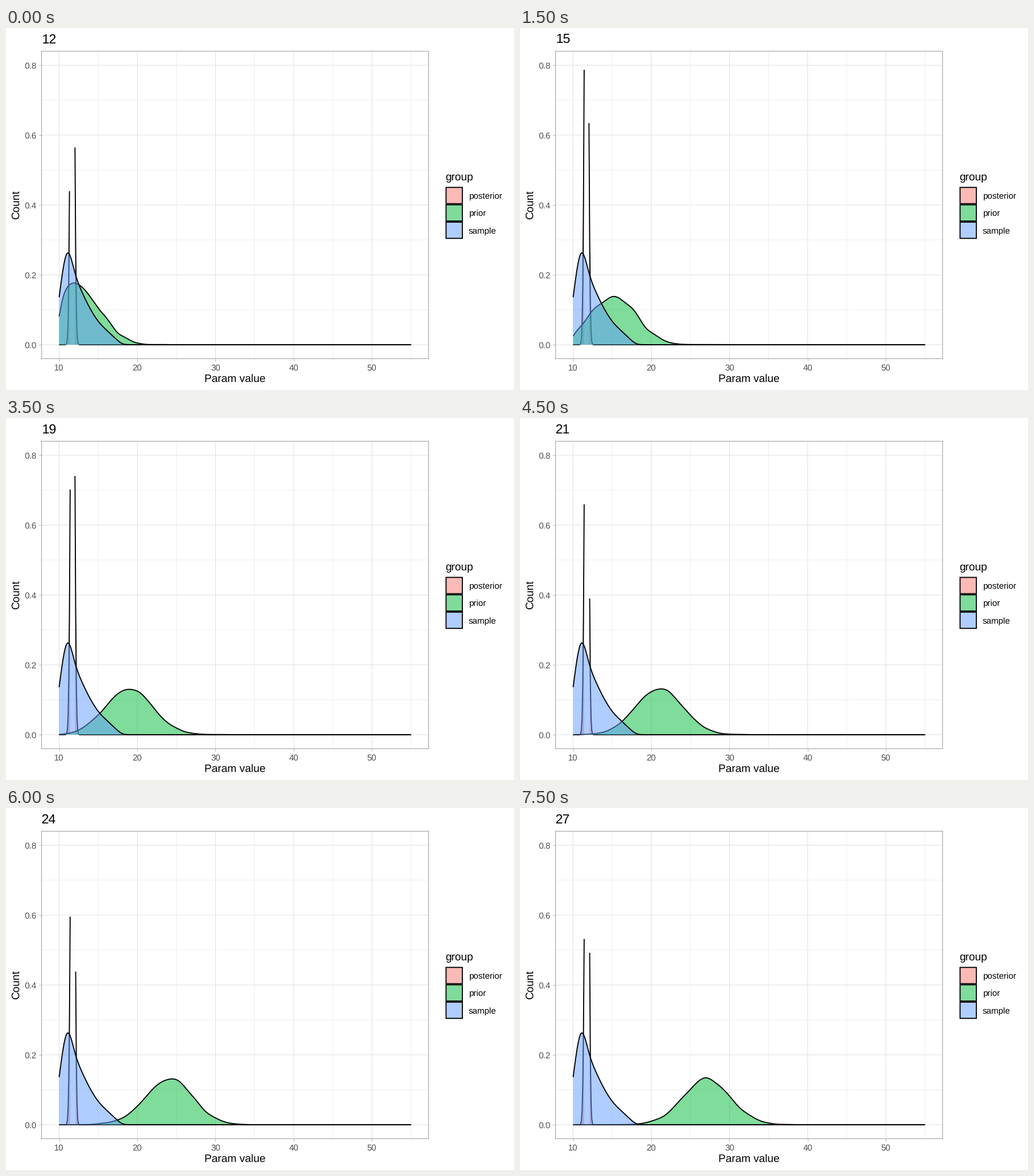
Write a matplotlib script that moves like this. It is 886 px wide and 632 px high and loops after 8 s.

```python
import math

import matplotlib.pyplot as plt
import numpy as np
from matplotlib.animation import FuncAnimation
from matplotlib.colors import to_rgba
from matplotlib.patches import Polygon, Rectangle

W, H, DPI = 886, 632, 64
PT = 72 / DPI  # points per pixel
FIRST, COUNT, STEP_MS = 12, 16, 500
LO, HI, TOP = 10, 55, 0.8
SD, DRAWS = 3.0, 4000
X = np.linspace(LO, HI, 512)
COLORS = {"posterior": "#F8766D", "prior": "#00BA38", "sample": "#619CFF"}
GRID, EDGE, TICK = "#DEDEDE", "#B3B3B3", "#4D4D4D"

plt.rcParams.update({"font.family": "Liberation Sans",
                     "text.hinting": "none", "text.hinting_factor": 1,
                     "path.snap": False})


def bell(x, center, sd):
    return np.exp(-((x - center) / sd)**2 / 2)


def spline(x, start, ys):
    """Natural cubic spline through values at unit steps from start."""
    n = len(ys)
    a, b = np.eye(n), np.zeros(n)
    for i in range(1, n - 1):
        a[i, i - 1:i + 2] = 1, 4, 1
        b[i] = 6 * (ys[i - 1] - 2 * ys[i] + ys[i + 1])
    m = np.linalg.solve(a, b)
    x = np.clip(x - start, 0, n - 1)
    i = np.minimum(x.astype(int), n - 2)
    t = x - i
    s = 1 - t
    return (s * ys[i] + t * ys[i + 1]
            + ((s**3 - s) * m[i] + (t**3 - t) * m[i + 1]) / 6)


def prior(mean):
    """Kernel density of normal draws cut off below LO."""
    draws = np.random.default_rng(mean).normal(mean, SD, DRAWS)
    draws = draws[draws > LO]
    bw = 0.226 * draws.std()
    kernels = bell(X[:, None], draws, bw)
    return kernels.mean(axis=1) / (bw * math.sqrt(2 * math.pi))


def posterior(mean):
    """Narrow peak drifting right; heights above TOP are left out."""
    age = mean - FIRST
    left = 1.93 * (1 - 0.025 * age) * bell(X, 11.665, 0.2)
    right = 1.53 * math.exp(0.0388 * age) * bell(X, 11.743, 0.2)
    a, b = (X < 11.7) & (left <= TOP), (X > 11.7) & (right <= TOP)
    return [(X[a], left[a]), (X[b], right[b])]


def sample():
    heights = np.array([136, 261, 208, 147, 102, 67, 43, 22, 4, 0]) / 1000
    return np.maximum(spline(X, LO, heights), 0)


fig = plt.figure(figsize=(W / DPI, H / DPI), dpi=DPI, facecolor="white")


def label(x, y, text, size, color="black", **kw):
    kw = {"va": "baseline", "ha": "left", **kw}
    return fig.text(x / W, 1 - y / H, text, fontsize=size * PT,
                    color=color, **kw)


# Panel
L, T, R, B = 62.0, 40.6, 737.0, 577.3
ax = fig.add_axes([L / W, 1 - B / H, (R - L) / W, (B - T) / H])
ax.set(xlim=(7.75, 57.25), ylim=(-0.04, 0.84))
ax.set_axisbelow(True)
ax.set_xticks(range(10, 51, 10))
ax.set_yticks(np.arange(0, 0.9, 0.2))
ax.set_xticks(range(15, 56, 10), minor=True)
ax.set_yticks(np.arange(0.1, 0.8, 0.2), minor=True)
ax.grid(which="major", color=GRID, lw=0.95 * PT)
ax.grid(which="minor", color=GRID, lw=0.5 * PT)
ax.tick_params(which="major", length=4.8 * PT, width=0.95 * PT,
               color=EDGE, labelbottom=False, labelleft=False)
ax.tick_params(which="minor", length=0)
for side in ax.spines.values():
    side.set(color=EDGE, linewidth=1.4 * PT)

# Labels
for v in range(10, 51, 10):
    label(L + (v - 7.75) * (R - L) / 49.5, 597.4, str(v), 15.4, TICK,
          ha="center")
for v in range(0, 9, 2):
    label(53.2, B - (v / 10 + 0.04) * (B - T) / 0.88 + 5.6, f"{v / 10:.1f}",
          15.4, TICK, ha="right")
label(399.5, 618.3, "Param value", 19.25, ha="center")
label(26.9, 308.8, "Count", 19.25, rotation=90, ha="right", va="center")
title = label(62, 27, "", 23.1)

# Legend
stage = fig.add_axes([0, 0, 1, 1])
stage.set(xlim=(0, W), ylim=(H, 0))
stage.axis("off")
label(766.4, 265.6, "group", 19.25)
for n, (name, color) in enumerate(COLORS.items()):
    y = 292.5 + 30.3 * n
    stage.add_patch(Rectangle((767.5, y - 14.2), 28.4, 28.4,
                              fc=to_rgba(color, 0.5), ec="black",
                              lw=1.87 * PT, joinstyle="miter"))
    label(806.8, y + 5.4, name, 15.4)

# Each group is a translucent area with its outline above it
areas, lines = {}, {}
for n, (name, color) in enumerate(COLORS.items()):
    areas[name] = ax.add_patch(Polygon([(LO, 0), (HI, 0)], lw=0,
                                       fc=to_rgba(color, 0.5),
                                       zorder=2 + 0.1 * n))
    lines[name], = ax.plot([], [], color="black", lw=1.87 * PT,
                           solid_capstyle="butt", solid_joinstyle="round",
                           zorder=2.05 + 0.1 * n)


def show(name, parts):
    shape, xs, ys = [], [], []
    for x, y in parts:
        shape += [(x[0], 0), *zip(x, y), (x[-1], 0)]
        xs += [*x, np.nan]
        ys += [*y, np.nan]
    areas[name].set_xy(shape)
    lines[name].set_data(xs, ys)


show("sample", [(X, sample())])


def update(i):
    mean = FIRST + i
    title.set_text(str(mean))
    show("posterior", posterior(mean))
    show("prior", [(X, prior(mean))])
    return [title, *areas.values(), *lines.values()]


anim = FuncAnimation(fig, update, frames=COUNT, interval=STEP_MS,
                     repeat=True, repeat_delay=0, blit=False)
plt.show()
```
